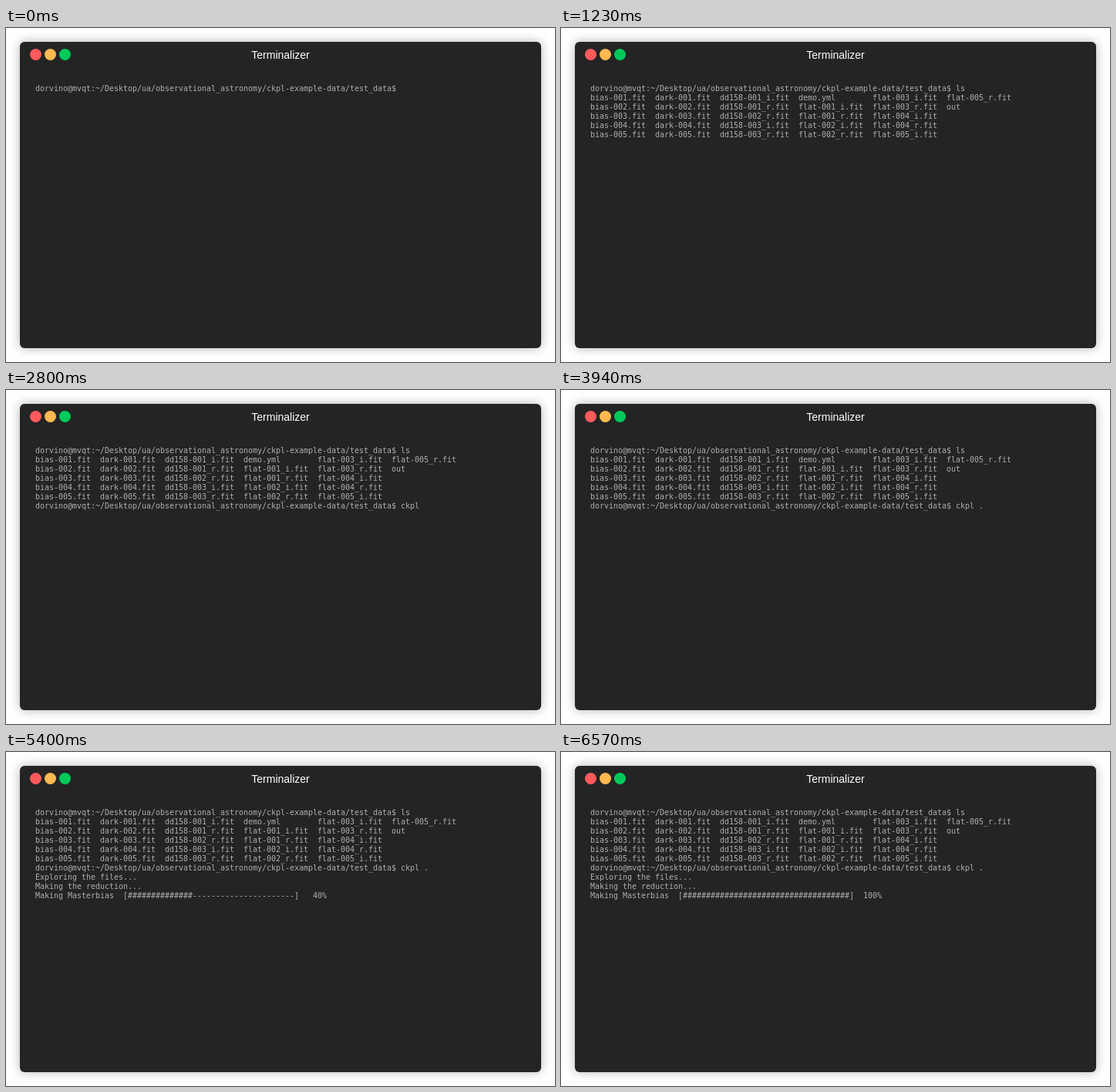
An HTML page with a canvas that plays this animation: 712x434 px, repeating every 8 s.

```html
<!DOCTYPE html>
<html lang="en">
<head>
<meta charset="utf-8">
<title>Terminal session</title>
<style>
  html, body { margin: 0; width: 100%; height: 100%; overflow: hidden; background: #fff; }
  canvas { display: block; }
</style>
</head>
<body>
<canvas id="stage" width="712" height="434"></canvas>
<script>
const ctx = document.getElementById('stage').getContext('2d');
const LOOP = 8000;
const CELL = { width: 6, height: 12, left: 38, baseline: 82 };
const PROMPT = 'dorvino@mvqt:~/Desktop/ua/observational_astronomy/ckpl-example-data/test_data$ ';

const numbered = prefix => [1, 2, 3, 4, 5].map(n => `${prefix}-00${n}.fit`);
const flats = numbered('flat').flatMap(f => ['_i', '_r'].map(band => f.replace('.', band + '.')));
const dd = ['1_i', '1_r', '2_r', '3_i', '3_r'].map(s => `dd158-00${s}.fit`);
const files = [...numbered('bias'), ...numbered('dark'), ...dd, 'demo.yml', ...flats, 'out'];

// Column-major listing, as printed by ls
function listing(names, rows) {
  const lines = Array(rows).fill('');
  for (let i = 0; i < names.length; i += rows) {
    const column = names.slice(i, i + rows);
    const width = Math.max(...column.map(n => n.length)) + 2;
    column.forEach((name, row) => lines[row] += name.padEnd(width));
  }
  return lines;
}
const lsOutput = listing(files, 5);

// Latest value whose start time has passed
const at = (t, steps) => steps.reduce((value, [start, next]) => t >= start ? next : value, '');

function progressLine(percent) {
  const filled = Math.floor(36 * percent / 100);
  const bar = '#'.repeat(filled).padEnd(36, '-');
  return `Making Masterbias  [${bar}]  ${String(percent).padStart(3)}%`;
}

function screenLines(t) {
  const lines = [PROMPT + at(t, [[500, 'l'], [620, 'ls']])];
  if (t >= 1230) lines.push(...lsOutput);
  if (t >= 1330) {
    lines.push(PROMPT + at(t, [[2380, 'c'], [2500, 'ck'], [2740, 'ckp'], [2800, 'ckpl'], [3940, 'ckpl .']]));
  }
  if (t >= 5060) lines.push('Exploring the files...');
  if (t >= 5110) {
    const percent = at(t, [[5110, 0], [5200, 20], [5400, 40], [5730, 60], [6130, 80], [6570, 100]]);
    lines.push('Making the reduction...', progressLine(percent));
  }
  return lines;
}

function drawWindow() {
  ctx.fillStyle = '#fff';
  ctx.fillRect(0, 0, 712, 434);

  ctx.save();
  ctx.shadowColor = 'rgba(0, 0, 0, 0.3)';
  ctx.shadowBlur = 14;
  ctx.fillStyle = '#242424';
  ctx.beginPath();
  ctx.roundRect(18, 18, 676, 398, 6);
  ctx.fill();
  ctx.restore();

  ['#ff5a5c', '#ffb950', '#00c95a'].forEach((color, i) => {
    ctx.fillStyle = color;
    ctx.beginPath();
    ctx.arc(38.5 + 19 * i, 34.5, 7.5, 0, 2 * Math.PI);
    ctx.fill();
  });

  ctx.fillStyle = '#fff';
  ctx.font = '14px "Liberation Sans", sans-serif';
  ctx.textAlign = 'center';
  ctx.fillText('Terminalizer', 356, 40);
}

function drawText(lines) {
  ctx.fillStyle = '#afafaf';
  ctx.font = '10px "DejaVu Sans Mono", monospace';
  ctx.textAlign = 'left';
  lines.forEach((line, row) => [...line].forEach((char, col) =>
    ctx.fillText(char, CELL.left + col * CELL.width, CELL.baseline + row * CELL.height)));
}

const start = performance.now();
function render() {
  drawWindow();
  drawText(screenLines((performance.now() - start) % LOOP));
  requestAnimationFrame(render);
}
render();
</script>
</body>
</html>
```
